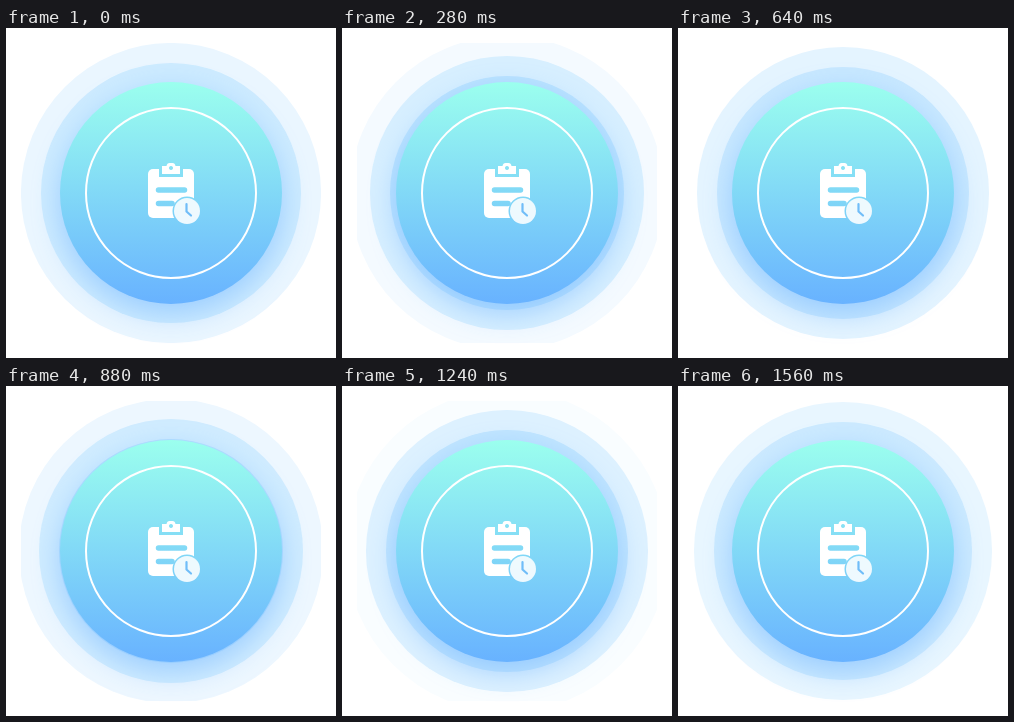
An HTML page that plays this animation: 330 by 330 pixels, repeating every 1.6 s.

```html
<!DOCTYPE html>
<html lang="en">
<head>
<meta charset="utf-8">
<title>Pulsing task button</title>
<style>
  html, body { margin: 0; width: 100%; height: 100%; overflow: hidden; background: #fff; }
  svg { display: block; width: 100vw; height: 100vh; }
</style>
</head>
<body>
<svg viewBox="0 0 330 330">
  <defs>
    <linearGradient id="face" x1="0" y1="0" x2="0" y2="1">
      <stop offset="0" stop-color="#9bffee"/>
      <stop offset="1" stop-color="#68b2ff"/>
    </linearGradient>
    <filter id="blur" x="-50%" y="-50%" width="200%" height="200%">
      <feGaussianBlur stdDeviation="14"/>
    </filter>
    <clipPath id="frame"><rect x="15" y="15" width="300" height="300"/></clipPath>
    <mask id="cutouts" maskUnits="userSpaceOnUse" x="130" y="125" width="70" height="75">
      <rect x="130" y="125" width="70" height="75" fill="#fff"/>
      <path d="M153 138V149H177V138Z"/>
      <path d="M152.5 162H178.5M152.5 175.5H166" stroke="#000" stroke-width="5.5" stroke-linecap="round"/>
      <circle cx="181" cy="183" r="14.5"/>
    </mask>
  </defs>

  <g id="waves" clip-path="url(#frame)"></g>

  <circle cx="165" cy="175" r="111" fill="#6ab0ff" opacity=".5" filter="url(#blur)"/>
  <circle cx="165" cy="165" r="111" fill="url(#face)"/>
  <circle cx="165" cy="165" r="85" fill="none" stroke="#fff" stroke-width="2"/>

  <rect x="142" y="141" width="46" height="49" rx="5" fill="#fff" mask="url(#cutouts)"/>
  <path fill="#fff" fill-rule="evenodd" d="M156 146V138H160.5Q161 135 163.5 135H166.500Q169 135 169.500 138H174V146Z
    M165 138a2 2 0 1 0 .01 0Z"/>
  <circle cx="181" cy="183" r="13" fill="#fff" opacity=".87"/>
  <path d="M180.500 176V183.500L185 187.500" fill="none" stroke="#70bdf8" stroke-width="2.2" stroke-linecap="round" stroke-linejoin="round"/>
</svg>
<script>
  const PERIOD = 800, GAP = 20, INNER = 110, FADE = 165;
  const group = document.getElementById('waves');

  // Largest first, so smaller discs sit on top.
  const discs = [2, 1, 0].map(step => {
    const el = document.createElementNS('http://www.w3.org/2000/svg', 'circle');
    el.setAttribute('cx', 165);
    el.setAttribute('cy', 165);
    group.appendChild(el);
    return { el, step };
  });

  function draw(time) {
    const phase = (time % PERIOD) / PERIOD;
    for (const { el, step } of discs) {
      const r = INNER + GAP * (step + phase);
      const depth = Math.max(0, FADE - r);
      el.setAttribute('r', r);
      el.setAttribute('fill', `rgb(${255 - 1.42 * depth}, ${255 - 0.58 * depth}, 255)`);
    }
  }

  const start = performance.now();
  function tick() {
    draw(performance.now() - start);
    requestAnimationFrame(tick);
  }
  tick();
</script>
</body>
</html>
```
